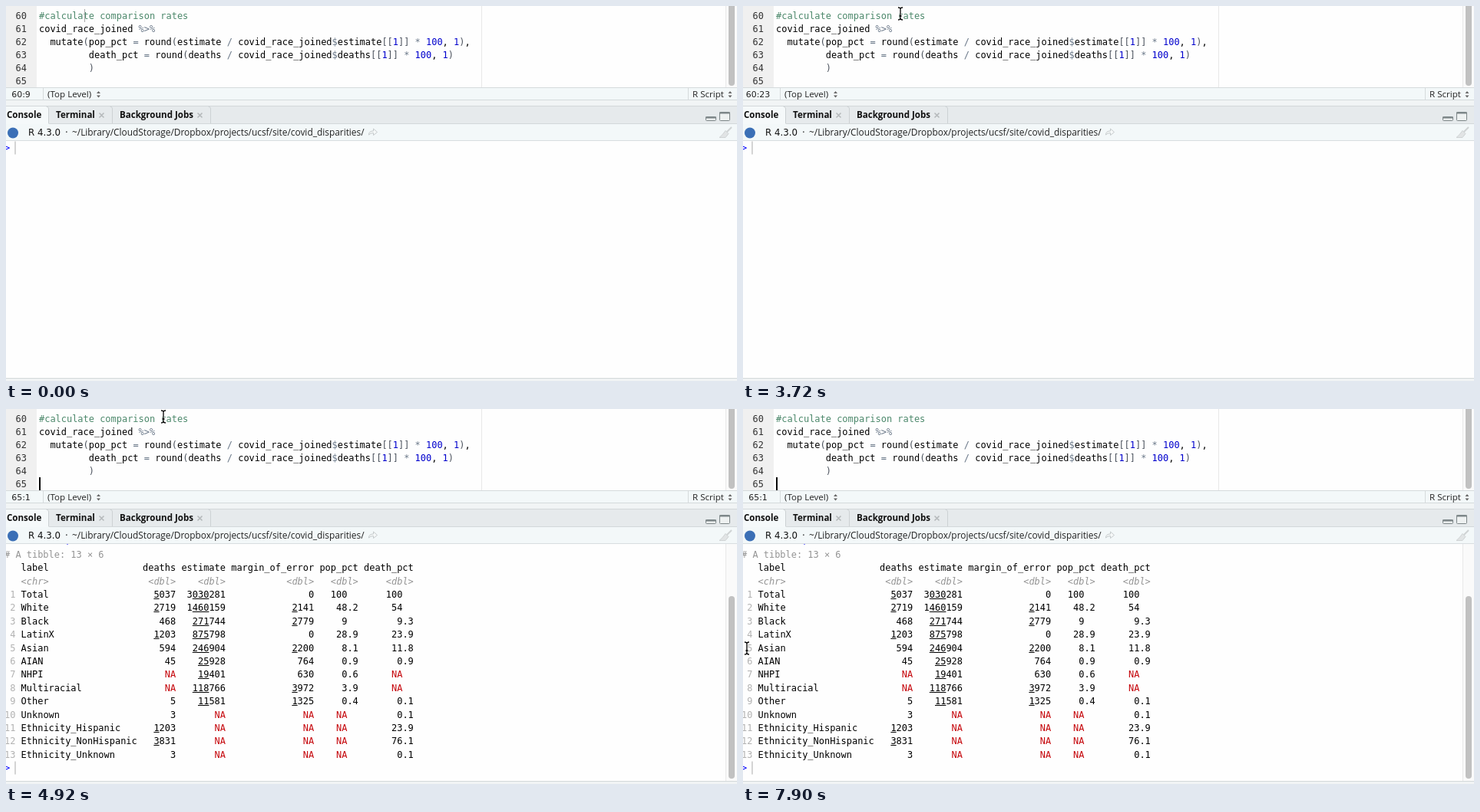
Recreate the animation shown at these times as an HTML page. Size 952x489 px, loop 8000 ms.

```html
<!DOCTYPE html>
<html lang="en">
<head>
<meta charset="utf-8">
<title>R session</title>
<style>
  html, body { margin: 0; width: 100%; height: 100%; overflow: hidden; background: #fefefe; }
  svg { display: block; width: 952px; height: 489px; }
  text { white-space: pre; }
  .mono { font: 11.96px "DejaVu Sans Mono", monospace; }
  .ui { font: 11.6px "Open Sans", "Noto Sans", sans-serif; }
  .path { font-size: 11.88px; }
  .tab { font: bold 11.55px "Open Sans", "Noto Sans", sans-serif; }
  .num { font: 11px "DejaVu Sans", sans-serif; }
  .version { font: 11.8px "DejaVu Sans", sans-serif; }
  .italic { font-style: italic; }
</style>
</head>
<body>
<svg id="stage" viewBox="0 0 952 489" xmlns="http://www.w3.org/2000/svg">
  <defs>
    <clipPath id="pane"><rect y="176" width="952" height="309"/></clipPath>
  </defs>
  <rect width="952" height="489" fill="#fefefe"/>

  <g id="editor">
    <rect width="40" height="106" fill="#f0f0f0"/>
    <path d="M619.5 0V106" stroke="#e8e8e8"/>
    <rect x="937" width="15" height="106" fill="#fafafa"/>
    <path d="M937.5 0V106" stroke="#e8e8e8"/>
    <path d="M941 0H949V100a4 4 0 0 1-8 0Z" fill="#c1c1c1"/>
  </g>

  <g id="status">
    <rect y="106" width="952" height="17" fill="#f3f8f9"/>
    <path d="M0 106.5H952M0 122.5H952M48.5 107V122M888.5 107V122" stroke="#d5dadc"/>
    <text id="position" class="num" x="19.5" y="119" text-anchor="middle" fill="#222"></text>
    <text class="ui" x="54" y="119" fill="#222">(Top Level)</text>
    <text class="ui" x="894" y="119" fill="#222">R Script</text>
    <path d="M118 114l2.5-3 2.5 3zm0 2.5l2.5 3 2.5-3zM940.5 114l2.5-3 2.5 3zm0 2.5l2.5 3 2.5-3z" fill="#666"/>
  </g>

  <g id="tabs">
    <rect y="123" width="952" height="7" fill="#f1f4f5"/>
    <rect y="130" width="952" height="24" fill="#e6eaec"/>
    <path d="M0 130.5H952M0 153.5H952" stroke="#d3d8da"/>
    <path d="M55.5 153.5V134q0-3-3-3H0V154H55.5" fill="#f5f9fa"/>
    <path d="M55.5 153V134q0-3-3-3M138.5 153V134q0-3-3-3M266.5 153V134q0-3-3-3" fill="none" stroke="#cdd2d4"/>
    <g class="tab" fill="#111">
      <text x="1" y="146">Console</text>
      <text x="65" y="146">Terminal</text>
      <text x="148" y="146">Background Jobs</text>
    </g>
    <path d="M121.5 139.5l6 6m0-6l-6 6M249.5 139.5l6 6m0-6l-6 6" stroke="#b6babc" stroke-width="1.6"/>
    <rect x="911.5" y="144.5" width="13" height="5" rx="1" fill="#e9ecec" stroke="#7d8688"/>
    <path d="M911 145.5H925" stroke="#7d8688" stroke-width="2"/>
    <rect x="929.5" y="138.5" width="13" height="11" rx="1" fill="#eef1f1" stroke="#7d8688"/>
    <path d="M929 139.5H943" stroke="#7d8688" stroke-width="2"/>
  </g>

  <g id="header">
    <rect y="154" width="952" height="21" fill="#f3f8f9"/>
    <path d="M0 175.5H952" stroke="#d8dde0"/>
    <circle cx="9" cy="165.5" r="7" fill="#3b6fb6"/>
    <text class="version" x="29" y="169" fill="#111">R 4.3.0</text>
    <text class="version" x="77" y="169" fill="#111">·</text>
    <text class="ui path" x="86" y="169" fill="#222">~/Library/CloudStorage/Dropbox/projects/ucsf/site/covid_disparities/</text>
    <path d="M472.5 168q0-5 6-5v-3l5 4.5-5 4v-3q-4 0-6 2.5Z" fill="#f6f9f9" stroke="#c5cacc"/>
    <path d="M945 158l-7 7" stroke="#cfd3d4" stroke-width="2"/>
    <path d="M937 162.5l4 4-4 5h-8q4-3 8-9Z" fill="#e1e4e5" stroke="#cfd3d4"/>
  </g>

  <g id="console" clip-path="url(#pane)">
    <g id="empty"></g>
    <g id="echo"></g>
    <g id="result"></g>
  </g>
  <rect y="485" width="952" height="4" fill="#f1f4f5"/>
  <path d="M0 485.5H952" stroke="#d3d8da"/>

  <rect id="caret" width="2" height="17"/>
  <g id="beam" fill="none">
    <path d="M-3-8Q0-8 0-6Q0-8 3-8M0-7V7M-3 8Q0 8 0 6Q0 8 3 8M-1.5 3H1.5" stroke="#fff" stroke-width="2.6"/>
    <path d="M-3-8Q0-8 0-6Q0-8 3-8M0-7V7M-3 8Q0 8 0 6Q0 8 3 8M-1.5 3H1.5" stroke="#000" stroke-width="1.3"/>
  </g>
  <path id="arrow" d="M0 0V14.5L3.3 11.5L5.7 17L8.2 16L5.8 10.5H10Z" fill="#000" stroke="#fff" stroke-width=".8"/>
</svg>

<script>
const LOOP = 8000, CHAR = 7.2;
const EDIT_X = 43, CONSOLE_X = -2;
const BLUE = '#0000ff', RED = '#c5060b', GRAY = '#949494';
const $ = id => document.getElementById(id);

function add(parent, tag, attrs, content = '') {
  const el = document.createElementNS('http://www.w3.org/2000/svg', tag);
  for (const key in attrs) el.setAttribute(key, attrs[key]);
  el.textContent = content;
  parent.append(el);
  return el;
}

function mono(parent, x, y, str, fill = '#000', extra = '') {
  add(parent, 'text', { x, y, fill, class: 'mono ' + extra }, str);
}

const code = [
  '#calculate comparison rates',
  'covid_race_joined %>%',
  '  mutate(pop_pct = round(estimate / covid_race_joined$estimate[[1]] * 100, 1),',
  '         death_pct = round(deaths / covid_race_joined$deaths[[1]] * 100, 1)',
  '         )'
];

function tokenColor(token) {
  if (token[0] === '#') return '#4c886b';
  if (/^\d/.test(token)) return '#0000cd';
  if (/^[()[\]]/.test(token)) return '#4a515c';
  return /^[%=\/$*]/.test(token) ? '#687687' : '#000';
}

function drawEditor() {
  const tokens = /#.*|%>%|\b\d+\b|[()[\]=\/$*]|\w+|,/g;
  for (let i = 0; i < 6; i++) {
    const y = 17 + i * 17;
    mono($('editor'), 12.5, y, String(60 + i), '#333');
    for (const m of (code[i] || '').matchAll(tokens))
      mono($('editor'), EDIT_X + m.index * CHAR, y, m[0], tokenColor(m[0]));
  }
}

function drawPrompt(parent, y) {
  mono(parent, CONSOLE_X, y, '>', BLUE);
  add(parent, 'rect', { x: 11.5, y: y - 12.5, width: 1, height: 17, fill: '#aaa' });
}

function drawEcho() {
  code.forEach((line, i) =>
    mono($('echo'), CONSOLE_X, Math.floor(189 + i * 17.5), (i < 2 ? '> ' : '+ ') + line, BLUE));
}

// Columns end at these character positions.
const ends = [31, 40, 56, 64, 74];
const heads = ['deaths', 'estimate', 'margin_of_error', 'pop_pct', 'death_pct'];
const rows = `Total 5037 3030281 0 100 100
White 2719 1460159 2141 48.2 54
Black 468 271744 2779 9 9.3
LatinX 1203 875798 0 28.9 23.9
Asian 594 246904 2200 8.1 11.8
AIAN 45 25928 764 0.9 0.9
NHPI NA 19401 630 0.6 NA
Multiracial NA 118766 3972 3.9 NA
Other 5 11581 1325 0.4 0.1
Unknown 3 NA NA NA 0.1
Ethnicity_Hispanic 1203 NA NA NA 23.9
Ethnicity_NonHispanic 3831 NA NA NA 76.1
Ethnicity_Unknown 3 NA NA NA 0.1`.split('\n').map(row => row.split(' '));

const col = n => CONSOLE_X + n * CHAR;

function drawCell(box, value, c, y) {
  const decimal = c > 2;
  const end = ends[c] - (decimal && !value.includes('.') ? 2 : 0);
  mono(box, col(end - value.length), y, value, value === 'NA' ? RED : '#000');
  // Thousands are underlined.
  const digits = Math.min(value.length, 6);
  if (!decimal && digits > 3)
    add(box, 'rect', { x: col(end - digits), y: y + 1, width: (digits - 3) * CHAR, height: 1 });
}

function drawResult() {
  const box = $('result'), at = i => Math.round(193.8 + i * 17.4);
  mono(box, CONSOLE_X, at(-1), '+ ' + code[4], BLUE);
  mono(box, CONSOLE_X, at(0), '# A tibble: 13 × 6', GRAY);
  mono(box, col(3), at(1), 'label');
  mono(box, col(3), at(2), '<chr>', GRAY, 'italic');
  heads.forEach((head, c) => {
    mono(box, col(ends[c] - head.length), at(1), head);
    mono(box, col(ends[c] - 5), at(2), '<dbl>', GRAY, 'italic');
  });
  rows.forEach(([label, ...cells], i) => {
    const y = at(i + 3);
    mono(box, CONSOLE_X, y, String(i + 1).padStart(2), '#b2b2b2');
    mono(box, col(3), y, label);
    cells.forEach((value, c) => drawCell(box, value, c, y));
  });
  drawPrompt(box, at(16));
  add(box, 'rect', { x: 937, y: 176, width: 15, height: 309, fill: '#fafafa' });
  add(box, 'rect', { x: 937, y: 176, width: 1, height: 309, fill: '#e8e8e8' });
  add(box, 'rect', { x: 941, y: 244, width: 8, height: 238, rx: 4, fill: '#c1c1c1' });
}

// Each entry holds from its time on: [time, x, y].
const pointer = [
  [0, 226, -30], [1490, 226, 1], [1640, 214, 4], [1790, 204, 6], [1930, 201, 8],
  [2080, 202, 9], [2230, 204, 10], [2520, 205, 10],
  [5820, 207, 22], [5970, 215, 72], [6120, 222, 129], [6270, 207, 200],
  [6420, 165, 255], [6560, 112, 288], [6710, 68, 304], [6860, 42, 309],
  [7000, 22, 311], [7150, 9, 312], [7300, 3, 312], [7450, 4, 312], [7900, 5, 312]
];
const places = [[0, '60:9'], [890, '52:32'], [2370, '60:23'], [3870, '65:1']];
const blinks = [2370, 2820, 3270, 3720, 3870, 4470, 4920, 5520, 5820, 6420, 6860, 7300, 7750];

const latest = (list, t) => list.findLast(entry => entry[0] <= t);
const show = (id, on) => $(id).setAttribute('visibility', on ? 'visible' : 'hidden');

function place(id, x, y) {
  $(id).setAttribute('transform', `translate(${x} ${y})`);
}

function drawCaret(t) {
  const idle = t < 890;
  const on = idle || blinks.filter(b => b <= t).length % 2 === 1;
  show('caret', on);
  $('caret').setAttribute('fill', idle ? '#aaa' : '#000');
  $('caret').setAttribute('width', idle ? 1 : 2);
  if (idle) place('caret', 102, 4);
  else if (t < 3870) place('caret', 201, 4);
  else place('caret', 43, 89);
}

function render(t) {
  $('position').textContent = latest(places, t)[1];
  show('empty', t < 3870);
  show('echo', t >= 3870 && t < 4020);
  show('result', t >= 4020);
  drawCaret(t);

  const [, x, y] = latest(pointer, t);
  const overBars = y > 106 && y < 176;
  show('beam', !overBars);
  show('arrow', overBars);
  place('beam', x, y);
  place('arrow', x, y);
}

drawEditor();
drawPrompt($('empty'), 189);
drawEcho();
drawResult();

const start = performance.now();
function tick() {
  render((performance.now() - start) % LOOP);
  requestAnimationFrame(tick);
}
tick();
</script>
</body>
</html>
```
